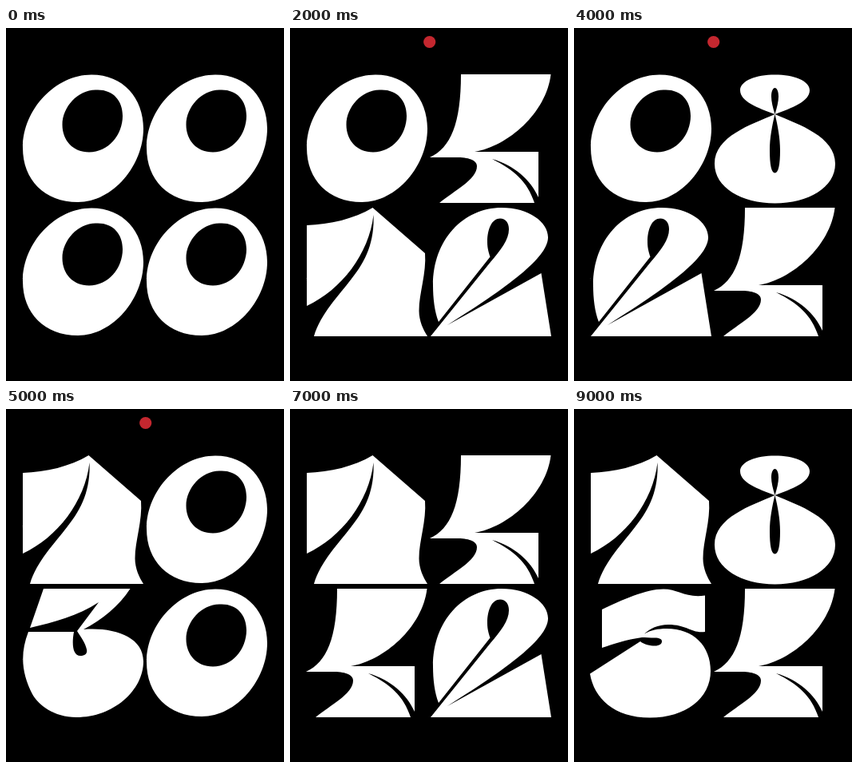
An HTML page for the animation above (10000 ms loop, 348 px wide and 442 px high).

```html
<!DOCTYPE html>
<html lang="en">
<head>
<meta charset="utf-8">
<title>Clock</title>
<style>
  html, body { margin: 0; width: 100%; height: 100%; overflow: hidden; background: #000; }
  svg { display: block; width: 348px; height: 442px; }
  .digit { fill: #fff; fill-rule: evenodd; }
  #dot { fill: #c4272f; }
</style>
</head>
<body>
<svg viewBox="0 0 348 442">
  <circle id="dot" cx="174.7" cy="17.5" r="7.6"/>
  <path class="digit"/>
  <path class="digit" transform="translate(155 0)"/>
  <path class="digit" transform="translate(0 167)"/>
  <path class="digit" transform="translate(155 167)"/>
</svg>
<script>
  // Outlines drawn in the top-left cell.
  const GLYPHS = {
    0: `M107 58.5C147 58.5 172 88 172 126C172 172 134 218 90 218C48 218 21 190 21 150C21 102 62 58.5 107 58.5Z
        M112 77.5C133 76 146 90 146 110C146 134 128 155.5 104 155.5C84 155.5 70.5 141 70.5 121C70.5 99 90 77.5 112 77.5Z`,
    1: `M21 80C50 79 80 72 103.5 58L169 115C171 140 161.5 165 161.5 187C161.5 200 167 211 172 219H30
        C38 191 62 167 77 147C95 125 106 100 104.5 67C99 116 64 161 21 181Z`,
    2: `M31 201C26 188 24 172 24 155C24 98 62 58 110 58C144 58 168 76 168 95C168 118 128 151 42 205
        L159.5 140L172 219H21L96 126C109 111 119 98 119 85C119 77 115 71.5 108 71.5
        C98 71.5 92 84 92 101C92 109 94 115 95.5 119.5Z`,
    3: `M47 58H155.5C142 79 120 97 97 109C135 106 172 118 172 149C172 185 135 219 88 219
        C60 219 40 203 33 190C20 165 17 140 28 112H85C82 129 84 142 93 142C100 142 102 138 101 134
        C99 125 94 119 89 111L116 75C90 92 60 100 30 107Z`,
    4: `M59 58H171.5C166 106 118 148 76 155H156V212C146 190 126 172 98 164C126 178 142 192 151 219H32
        C50 204 79 190 79 173C79 165 68 162 53 162H20C46 150 59 120 59 58Z`,
    5: `M35 84C60 72 90 58.5 112 58.5C130 58.5 140 70 164 66.5V112C146 114 142 103 118 103
        C105 103 95 108 88 114.5C96 110 105 108 116 108C150 108 171 130 171 161
        C171 195 140 219.5 95 219.5C50 219.5 25 195 20 164.5L83 124C88 128 95 129.5 101 129.5
        C107 129.5 110 127 110 124C110 121 107 119.5 101 119.5C95 119.5 90 119 85 119C65 122 50 127 35 132Z`,
    6: `M136 59V139C107 145 85 163 85 183C85 198 95 210 105 210C108 210 108 207 107 204
        C106 196 96 190 92 181L155 138.5C166 146 172 158 172 171C172 192 144 218 112 219.5H96
        C60 212 21 186 21 142C21 92 65 57 136 59Z`,
    8: `M96.5 108C75 100 53 92 53 78C53 66 73 58.5 96.5 58.5C120 58.5 140 66 140 78C140 92 118 100 96.5 108
        C127 121 172 136 172 170C172 200 138 219.5 96.5 219.5C55 219.5 21 200 21 170C21 136 66 121 96.5 108Z
        M96.5 108C94 100 92 92 92 86C92 79 94 75 96.5 75C99 75 101 79 101 86C101 92 99 100 96.5 108
        C100 122 103 138 103 153C103 171 101 181.5 96.5 181.5C92 181.5 90 171 90 153C90 138 93 122 96.5 108Z`
  };
  const cells = document.querySelectorAll('.digit');
  const dot = document.getElementById('dot');
  const twoDigits = n => String(n).padStart(2, '0');
  let shown = -1;

  // Each second advances the clock by two hours and six minutes.
  function show(step) {
    const digits = twoDigits(step * 2) + twoDigits(step * 6);
    cells.forEach((cell, i) => cell.setAttribute('d', GLYPHS[digits[i]]));
    dot.style.display = step >= 2 && step < 6 ? '' : 'none';
    shown = step;
  }

  const start = performance.now();
  function tick() {
    const step = Math.floor((performance.now() - start) / 1000) % 10;
    if (step !== shown) show(step);
    requestAnimationFrame(tick);
  }
  tick();
</script>
</body>
</html>
```
